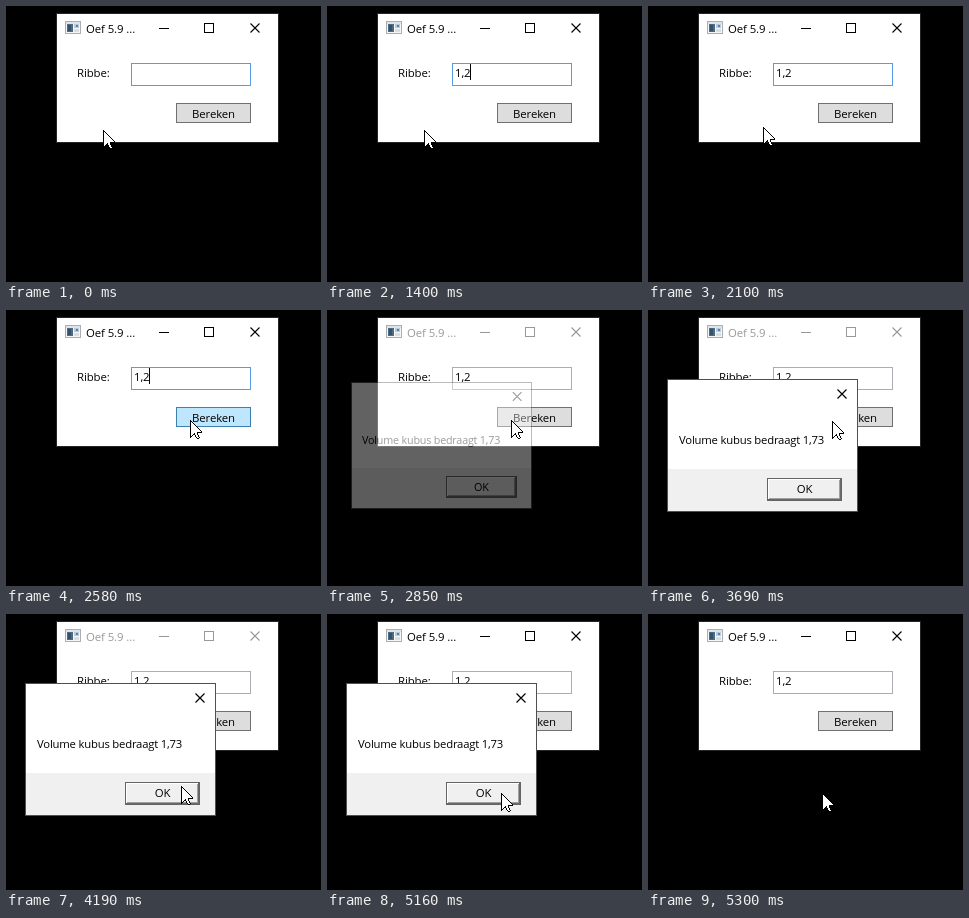
An HTML page that plays this animation: 315x276 px, repeating every 6710 ms.

```html
<!DOCTYPE html>
<html lang="nl">
<head>
<meta charset="utf-8">
<title>Ribbe</title>
<style>
html, body { margin: 0; width: 100%; height: 100%; overflow: hidden; background: #000; }
svg { display: block; width: 100%; height: 100%; }
text { font: 11.4px "Open Sans", "Noto Sans", sans-serif; letter-spacing: -.1px; white-space: pre; }
rect, .crisp { shape-rendering: crispEdges; }
.mid { text-anchor: middle; }
.line { fill: none; stroke: currentColor; }
</style>
</head>
<body>
<svg viewBox="0 0 315 276">
  <rect width="315" height="276"/>

  <g id="win">
    <rect x="50" y="7" width="223" height="130" fill="#262626"/>
    <rect x="51" y="8" width="221" height="128" fill="#fff"/>
    <g id="icon">
      <rect x="59.5" y="15.5" width="15" height="12" fill="#f4f6f7" stroke="#a9b0b5"/>
      <rect x="60" y="16" width="14" height="2" fill="#dfe4e8"/>
      <rect x="61" y="18" width="6" height="8" fill="#4d6a80"/>
      <rect x="62" y="19" width="3" height="6" fill="#36526a"/>
      <rect x="68" y="18" width="5" height="4" fill="#b9c9d6"/>
      <rect x="70" y="19" width="2" height="2" fill="#4b86c0"/>
      <rect x="68" y="23" width="5" height="3" fill="#d9dee2"/>
    </g>
    <g id="bar">
      <text x="80" y="27" fill="currentColor">Oef 5.9 ...</text>
      <path class="line crisp" d="M153 22.5H163M198.500 17.500h9v9h-9z"/>
      <path class="line" d="M244.500 17.500l9 9m0-9l-9 9" stroke-width="1.1"/>
    </g>
    <text x="71" y="71">Ribbe:</text>
    <rect id="field" x="125.500" y="57.500" width="119" height="22" fill="#fff"/>
    <text id="value" x="128" y="71"></text>
    <rect id="caret" y="58" width="1" height="16"/>
    <rect id="calc" x="170.500" y="97.500" width="74" height="19"/>
    <text class="mid" x="207.500" y="112">Bereken</text>
  </g>

  <g id="dialog">
    <rect x="19" y="69" width="191" height="133" fill="#505050"/>
    <rect x="20" y="70" width="189" height="131" fill="#fff"/>
    <rect x="20" y="159" width="189" height="42" fill="#f0f0f0"/>
    <path class="line" d="M189.500 79.500l9 9m0-9l-9 9" stroke-width="1.2"/>
    <text x="31" y="134" style="font-size:11.3px;letter-spacing:-.2px">Volume kubus bedraagt 1,73</text>
    <rect x="119.500" y="168.500" width="74" height="22" fill="#f0f0f0" stroke="#646464"/>
    <g id="raised" class="line crisp">
      <path d="M120.500 189V169.500H192" stroke="#fff"/>
      <path d="M120 189.500H192.500V169" stroke="#696969"/>
      <path d="M121 188.500H191.500V170" stroke="#a0a0a0"/>
    </g>
    <rect id="sunken" x="120.500" y="169.500" width="72" height="20" fill="none" stroke="#a0a0a0"/>
    <text id="ok" class="mid" x="156.500" y="183">OK</text>
  </g>

  <g id="mouse" class="crisp">
    <path d="M0 0H.7L12 11.300V13H8V15H9V17H10V18H9V19H7V18H6V17H5V15H3V16H2V17H1V18H0Z"/>
    <path fill="#fff" d="M1 1.300L11.700 12H7V15H8V17H9V18H7V17H6V15H5V13H4V14H3V15H2V16H1Z"/>
  </g>
</svg>
<script>
const LOOP = 6710;
const $ = id => document.getElementById(id);
const set = (id, attrs) => {
  for (const k in attrs) $(id).setAttribute(k, attrs[k]);
};
const show = (id, on) => set(id, { visibility: on ? 'visible' : 'hidden' });
const clamp = x => Math.min(1, Math.max(0, x));
const smooth = p => p * p * p * (p * (6 * p - 15) + 10);
const linear = p => p;

// The screen refreshes in discrete steps between start and end.
const stepped = (t, start, end, n) =>
  t < start ? 0 : clamp((Math.floor((t - start) / (end - start) * (n - 1) + 1e-6) + 1) / n);

const moves = [
  { start: 1940, end: 2580, n: 9, ease: smooth, to: [184, 110] },
  { start: 3610, end: 4270, n: 9, ease: smooth, to: [175, 173] },
  { start: 4350, end: 4660, n: 5, ease: linear, to: [174, 179] }
];

function mouseAt(t) {
  let pos = [97, 124];
  for (const m of moves) {
    const p = m.ease(stepped(t, m.start, m.end, m.n));
    pos = pos.map((v, i) => v + (m.to[i] - v) * p);
  }
  return pos.map(Math.round);
}

function drawField(t) {
  const focus = t < 2660;
  const typed = t < 860 ? 0 : t < 1080 ? 1 : t < 1320 ? 2 : 3;
  $('value').textContent = '1,2'.slice(0, typed);
  set('field', { stroke: focus ? '#569de5' : '#abadb3' });
  set('caret', { x: [128, 134, 137, 143][typed] });
  const blink = t < 300 || (t >= 1320 && t < 1400) || (t >= 1940 && t < 2420);
  show('caret', focus && !blink);
}

function drawCalc(t, [x, y]) {
  const over = t < 2820 && x >= 170 && x < 245 && y >= 97 && y < 117;
  const down = t >= 2660 && t < 2740;
  set('calc', {
    fill: down ? '#c4e5f6' : over ? '#bee6fd' : '#ddd',
    stroke: down ? '#2c628b' : over ? '#3c7fb1' : '#707070'
  });
}

function drawDialog(t) {
  const open = t >= 2820 && t < 5300;
  show('dialog', open);
  let alpha = 1, scale = 1;
  if (t < 3070) {
    const tick = t < 2910 ? 2820 : t < 2990 ? 2910 : 2990;
    const rest = 1 - clamp((tick - 2760) / 280);
    alpha = 1 - rest ** 2;
    scale = 1 - .1 * rest ** 3;
    if (tick === 2990) scale = 1;
  } else if (t >= 5220) {
    alpha = .45;
    scale = .96;
  }
  set('dialog', {
    opacity: alpha,
    transform: `translate(114.500 135.500) scale(${scale}) translate(-114.500 -135.500)`
  });
  const down = t >= 4990 && t < 5160;
  show('raised', open && !down);
  show('sunken', open && down);
  set('ok', { transform: down ? 'translate(1 1)' : '' });
}

function draw(t) {
  const pos = mouseAt(t);
  const inactive = t >= 2820 && t < 5160;
  set('bar', { color: inactive ? '#999' : '#000' });
  drawField(t);
  drawCalc(t, pos);
  drawDialog(t);
  set('mouse', { transform: `translate(${pos})` });
}

const began = performance.now();
function tick() {
  draw((performance.now() - began) % LOOP);
  requestAnimationFrame(tick);
}
draw(0);
requestAnimationFrame(tick);
</script>
</body>
</html>
```
